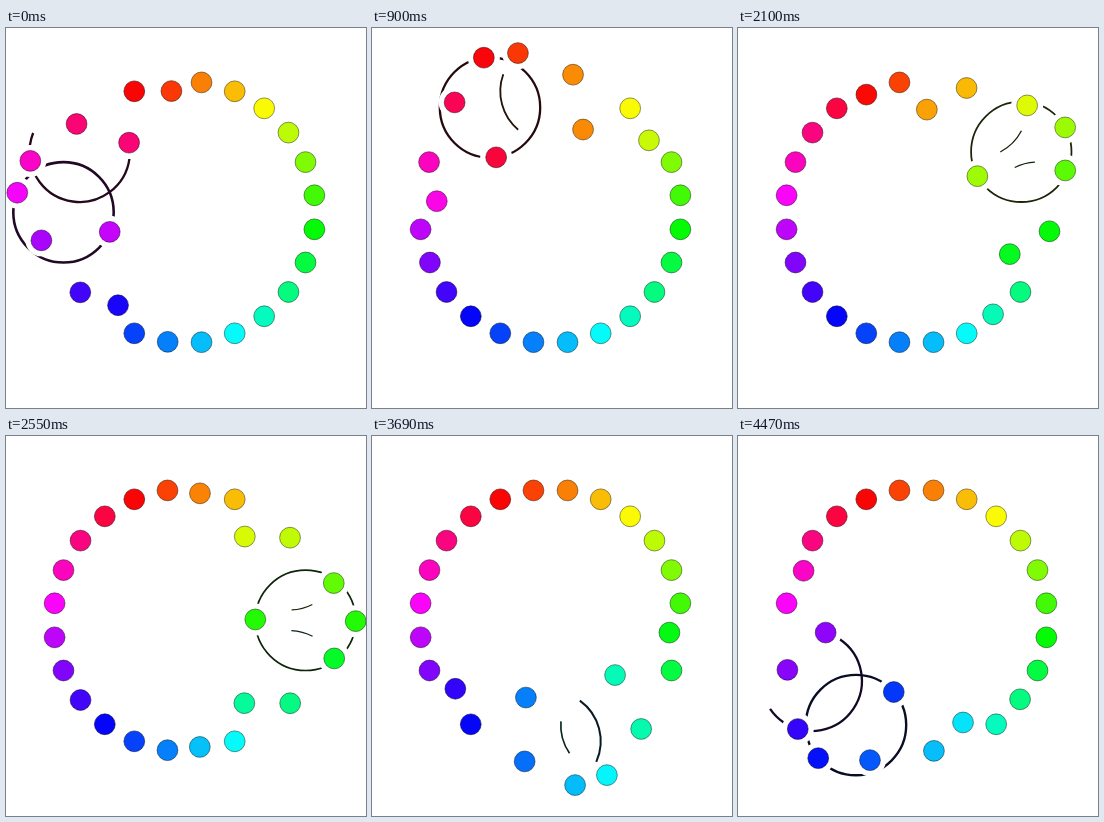
Recreate the animation shown at these times as an HTML page with a canvas. Size 360 by 380 pixels, loop 4.5 s.

```html
<!DOCTYPE html>
<html lang="en">
<head>
<meta charset="utf-8">
<title>Rainbow swap</title>
<style>
  html, body { margin: 0; width: 100%; height: 100%; overflow: hidden; background: #fff; }
  canvas { display: block; }
</style>
</head>
<body>
<canvas id="stage" width="360" height="380"></canvas>
<script>
const ctx = document.getElementById('stage').getContext('2d');
const RAD = Math.PI / 180;
const LOOP = 4500, STEP = 30;
const CENTER = { x: 178.5, y: 184.3 };
const TRACK = 121;      // distance of the small rings from the centre
const RING = 50.2;      // radius of a small ring
const BALL = 10.4, HALO = 16;
const REACH = 76;       // degrees of sweep before and after a ring's midpoint

const wrap = a => ((a + 180) % 360 + 360) % 360 - 180;
const polar = (o, r, deg) => ({
  x: o.x + r * Math.sin(deg * RAD),
  y: o.y - r * Math.cos(deg * RAD)
});

// Quadratic ease in and out, from -1 to 1.
function swing(phase) {
  const rest = 1 - Math.min(1, Math.abs(phase) / REACH);
  return Math.sign(phase) * (1 - rest * rest);
}

function disc(p, r, fill) {
  ctx.beginPath();
  ctx.arc(p.x, p.y, r, 0, 2 * Math.PI);
  ctx.fillStyle = fill;
  ctx.fill();
}

// A ring shows whole near its midpoint, otherwise only the side facing its
// neighbour; purple rings stay heavier and longer than green ones.
function drawRing(ring) {
  const age = Math.abs(ring.phase);
  if (age > 34) return;
  const weight = 0.5 - 0.5 * Math.cos((ring.hue - 110) * RAD);
  ctx.beginPath();
  if (age < 13) {
    ctx.arc(ring.x, ring.y, RING, 0, 2 * Math.PI);
  } else {
    const half = (12 + 100 * weight * weight) * RAD;
    const middle = (ring.angle + Math.sign(ring.phase) * 105 - 90) * RAD;
    ctx.arc(ring.x, ring.y, RING, middle - half, middle + half);
  }
  ctx.lineWidth = 1.7 + 1.1 * weight - age * 0.02;
  ctx.strokeStyle = `hsl(${ring.hue}, 60%, 9%)`;
  ctx.stroke();
}

function drawBall(ball) {
  disc(ball, BALL, `hsl(${ball.hue}, 96%, 50%)`);
  ctx.lineWidth = 0.7;
  ctx.strokeStyle = `hsla(${ball.hue}, 80%, 14%, 0.8)`;
  ctx.stroke();
}

function render(time) {
  const sweep = 280.4 + time / 15;
  const rings = [], balls = [];
  for (let i = 0; i < 12; i++) {
    const angle = i * 30, phase = wrap(sweep - angle), hue = angle + 22.5;
    const ring = { ...polar(CENTER, TRACK, angle), angle, phase, hue };
    const turn = swing(phase);
    rings.push(ring);
    for (const side of [1, -1]) {
      const at = angle + 90 * turn + (side < 0 ? 180 : 0);
      balls.push({ ...polar(ring, RING, at), hue: hue + side * 22.5 * turn });
    }
  }
  ctx.fillStyle = '#fff';
  ctx.fillRect(0, 0, 360, 380);
  rings.forEach(drawRing);
  balls.forEach(ball => disc(ball, HALO, '#fff'));
  balls.forEach(drawBall);
}

const start = performance.now();
function tick() {
  const time = (performance.now() - start) % LOOP;
  render(Math.floor(time / STEP) * STEP);
  requestAnimationFrame(tick);
}
tick();
</script>
</body>
</html>
```
